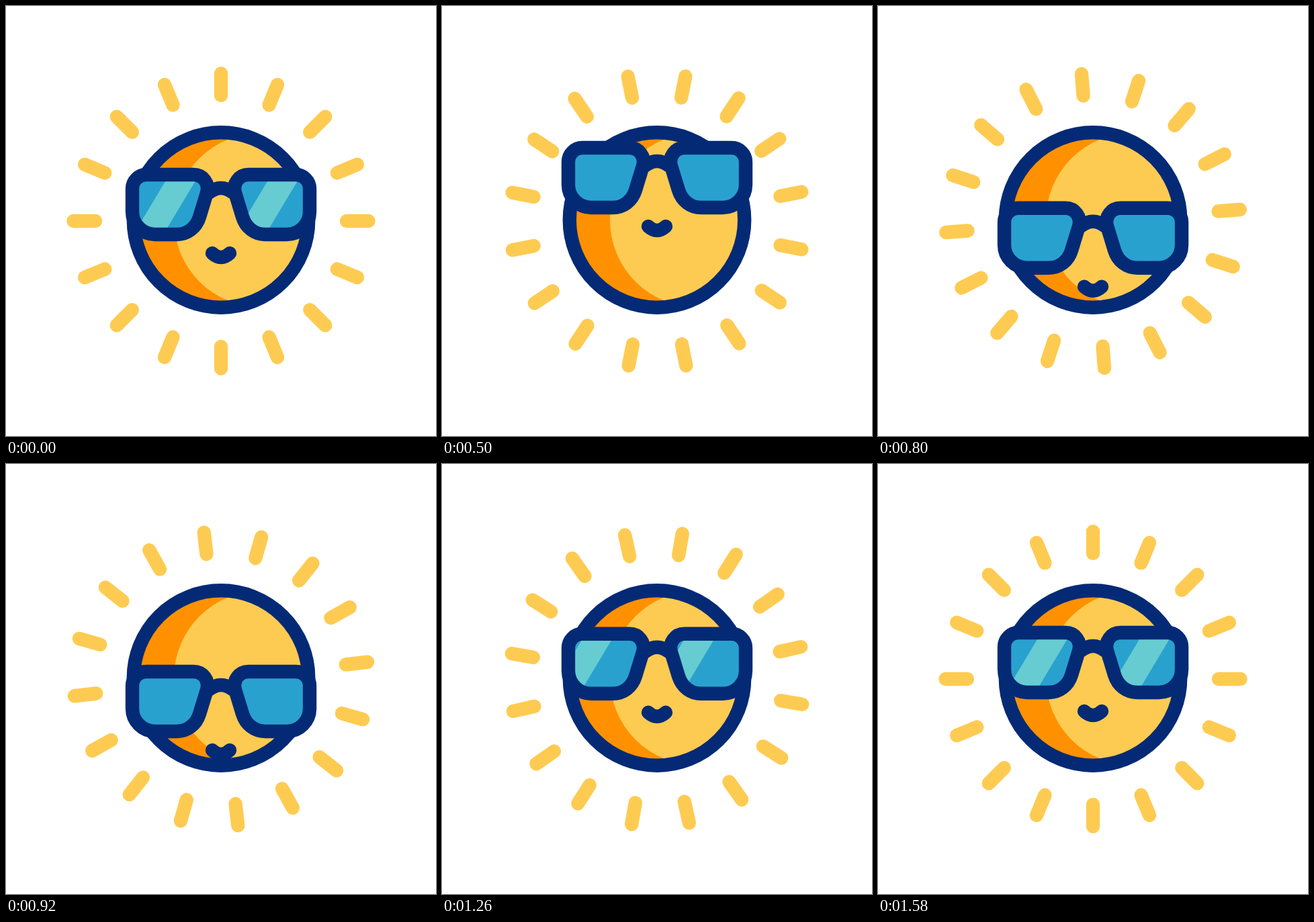
These frames come from a looping animation (640x640 px, 1.62 s). An HTML page with a canvas:

```html
<!DOCTYPE html>
<html lang="en">
<head>
<meta charset="utf-8">
<title>Cool sun</title>
<style>
  html, body { margin: 0; width: 100%; height: 100%; overflow: hidden; background: #fff; }
  canvas { display: block; width: 640px; height: 640px; }
</style>
</head>
<body>
<canvas id="stage" width="640" height="640"></canvas>
<script>
const ctx = document.getElementById('stage').getContext('2d');
const LOOP = 1620;
const NAVY = '#042a76', YELLOW = '#fecb52', ORANGE = '#ff9100';
const LENS = '#29a1ce', GLOSS = '#66ccd1';
const TAU = Math.PI * 2;

// Keys are [time, value]; values ease in and out between them.
const SHADES_Y = [[20, 0], [510, -40], [873, 60], [1306, 0]];
const GLOSS_X = [[20, 0], [255, -100], [873, -100], [1480, 0]];

const smooth = u => u * u * (3 - 2 * u);
const clamp01 = v => Math.min(1, Math.max(0, v));

function track(keys, t) {
  let value = keys[0][1];
  for (let i = 1; i < keys.length; i++) {
    const [start, from] = keys[i - 1], [end, to] = keys[i];
    if (t >= start) value = from + (to - from) * smooth(clamp01((t - start) / (end - start)));
  }
  return value;
}

// Cubic Bezier easing with handles (x1, 0) and (x2, 1).
function bezierEase(x, x1, x2) {
  let low = 0, high = 1;
  for (let i = 0; i < 30; i++) {
    const u = (low + high) / 2, v = 1 - u;
    if (3 * x1 * u * v * v + 3 * x2 * u * u * v + u * u * u < x) low = u;
    else high = u;
  }
  return smooth(low);
}

const rayAngle = t => -TAU * bezierEase(clamp01((t - 162) / 1314), 0.332, 0.725);

const leftLens = new Path2D(
  'M188 272A21 21 0 0 1 209 251H279C293 251 303 264 299 278' +
  'L288 314C283 330 270 340 254 340H222A34 34 0 0 1 188 306Z');
const rightLens = new Path2D();
rightLens.addPath(leftLens, new DOMMatrix([-1, 0, 0, 1, 640, 0]));
const bridge = new Path2D('M302 278Q320 264 338 278');
const smile = new Path2D('M307 368Q320 380 333 368');

function disc(x, y, r, color) {
  ctx.beginPath();
  ctx.arc(x, y, r, 0, TAU);
  ctx.fillStyle = color;
  ctx.fill();
}

function drawRays(angle) {
  ctx.save();
  ctx.translate(320, 320);
  ctx.rotate(angle);
  ctx.strokeStyle = YELLOW;
  ctx.lineWidth = 20.4;
  ctx.beginPath();
  for (let i = 0; i < 16; i++) {
    const x = Math.cos(i * TAU / 16), y = Math.sin(i * TAU / 16);
    ctx.moveTo(187 * x, 187 * y);
    ctx.lineTo(219.5 * x, 219.5 * y);
  }
  ctx.stroke();
  ctx.restore();
}

function drawBall() {
  ctx.save();
  ctx.beginPath();
  ctx.arc(320, 318.5, 130, 0, TAU);
  ctx.clip();
  ctx.fillStyle = ORANGE;
  ctx.fillRect(180, 180, 280, 280);
  disc(380, 318.5, 130, YELLOW);
  ctx.restore();
  ctx.beginPath();
  ctx.arc(320, 318.5, 130.2, 0, TAU);
  ctx.lineWidth = 20.4;
  ctx.strokeStyle = NAVY;
  ctx.stroke();
}

function drawLens(path, glossX) {
  ctx.fillStyle = LENS;
  ctx.fill(path);
  ctx.save();
  ctx.clip(path);
  ctx.fillStyle = GLOSS;
  ctx.beginPath();
  ctx.moveTo(glossX + 6, 252);
  ctx.lineTo(glossX + 50.5, 252);
  ctx.lineTo(glossX - 3.5, 342);
  ctx.lineTo(glossX - 48, 342);
  ctx.fill();
  ctx.restore();
  ctx.stroke(path);
}

function drawFace(y, glossShift) {
  ctx.save();
  ctx.translate(0, y);
  ctx.strokeStyle = NAVY;
  ctx.lineWidth = 20.4;
  drawLens(leftLens, 236.5 + glossShift);
  drawLens(rightLens, 388.5 + glossShift);
  ctx.stroke(bridge);
  ctx.stroke(smile);
  ctx.restore();
}

function draw(t) {
  ctx.fillStyle = '#fff';
  ctx.fillRect(0, 0, 640, 640);
  ctx.lineCap = ctx.lineJoin = 'round';
  drawRays(rayAngle(t));
  drawBall();
  drawFace(track(SHADES_Y, t), track(GLOSS_X, t));
}

const startTime = performance.now();
function tick() {
  draw((performance.now() - startTime) % LOOP);
  requestAnimationFrame(tick);
}
tick();
</script>
</body>
</html>
```
